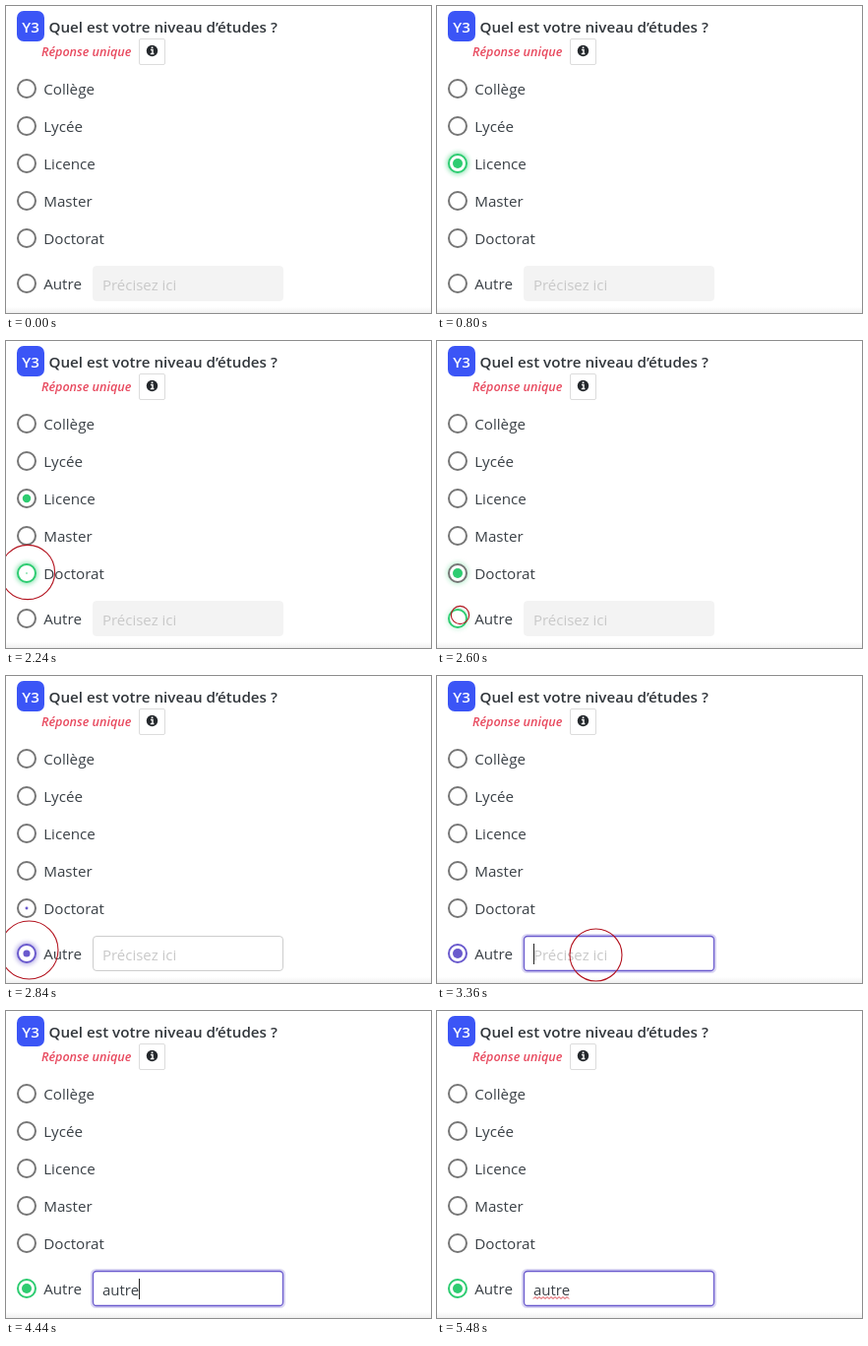
An HTML page that plays this animation: 432x312 px, repeating every 5520 ms.

```html
<!DOCTYPE html>
<html lang="fr">
<head>
<meta charset="utf-8">
<title>Niveau d’études</title>
<style>
  html, body { margin: 0; width: 100%; height: 100%; overflow: hidden; background: #fff; }
  svg { display: block; width: 432px; height: 312px; }
  text { font: 15.2px "Open Sans", "Noto Sans", sans-serif; fill: #3a4046; }
  .title { font-weight: 600; fill: #32373c; }
  .badge { font-weight: 600; fill: #fff; text-anchor: middle; }
  .hint { font-weight: 600; font-style: italic; font-size: 12.6px; fill: #e84a5f; }
  #value { font-size: 15px; }
</style>
</head>
<body>
<svg viewBox="0 0 432 312">
  <defs>
    <filter id="blur" x="-50%" y="-50%" width="200%" height="200%"><feGaussianBlur stdDeviation="2"/></filter>
    <linearGradient id="shade" x2="0" y2="1">
      <stop offset="0" stop-color="#fff"/><stop offset="1" stop-color="#f0f0f0"/>
    </linearGradient>
  </defs>
  <rect width="432" height="312" fill="#fff"/>
  <rect y="306" width="432" height="6" fill="url(#shade)"/>
  <rect x="11" y="5" width="28" height="31" rx="7" fill="#3b55f6"/>
  <text class="badge" x="25" y="27">Y3</text>
  <text class="title" x="43.5" y="27">Quel est votre niveau d’études ?</text>
  <text class="hint" x="36" y="51">Réponse unique</text>
  <rect x="135.5" y="33.5" width="26" height="26" rx="1.5" fill="#fff" stroke="#dcdcdc"/>
  <circle cx="148.5" cy="45.5" r="5.7" fill="#24282c"/>
  <path d="M147 44.5h2v3.6M146.8 48.5h3.6M147.7 42.3h1.7" fill="none" stroke="#fff" stroke-width="1.4"/>
  <g id="radios"></g>
  <rect id="halo" x="87.5" y="263.5" width="195" height="37" rx="4" fill="none" stroke="#6a5acd" stroke-width="3" opacity="0"/>
  <rect id="field" x="88.5" y="264.5" width="193" height="35" rx="3.5"/>
  <text id="value" x="98" y="289"></text>
  <path id="squiggle" fill="none" stroke="#d8323c"/>
  <path id="caret" stroke="#222"/>
  <circle id="ripple" fill="none" stroke="#b3131f" stroke-width="1.1"/>
</svg>
<script>
const LOOP = 5520, STEP = 40;
const GREEN = '#2ecc71', PURPLE = '#6a5acd', GREY = '#767676';
const LICENCE = 2, DOCTORAT = 4, AUTRE = 5;
const ENABLED = 2740, FOCUSED = 3200, TYPED = 3720;

const options = [['Collège', 84], ['Lycée', 122], ['Licence', 160],
                 ['Master', 198], ['Doctorat', 236], ['Autre', 282]];
// When each chosen option gains focus, gets checked, loses focus, gets unchecked
const choices = {
  [LICENCE]: { focus: 520, check: 600, blur: 2000, uncheck: 2220 },
  [DOCTORAT]: { focus: 2000, check: 2220, blur: 2560, uncheck: ENABLED },
  [AUTRE]: { focus: 2560, check: ENABLED, blur: FOCUSED, uncheck: Infinity }
};
const clicks = [[520, 22, 160], [2060, 22, 235], [2565, 23.5, 278.5], [FOCUSED, 161.5, 283.5]];
const keyTimes = [TYPED, 3920, 4000, 4240, 4440];
const word = 'autre';

const $ = id => document.getElementById(id);
const set = (el, attrs) => { for (const k in attrs) el.setAttribute(k, attrs[k]); };
const add = (parent, tag, attrs) => {
  const el = document.createElementNS('http://www.w3.org/2000/svg', tag);
  set(el, attrs);
  return parent.appendChild(el);
};
const ramp = (t, start, length) => Math.sin(Math.min(1, Math.max(0, (t - start) / length)) * Math.PI / 2);
const mix = (a, b, k) => Math.round(a + (b - a) * k);
const grey = v => `rgb(${v},${v},${v})`;

const radios = options.map(([label, cy]) => {
  const group = $('radios'), at = { cx: 21, cy };
  const glow = add(group, 'circle', { ...at, r: 11.5, filter: 'url(#blur)', opacity: 0 });
  const ring = add(group, 'circle', { ...at, r: 9, fill: '#fff', 'stroke-width': 2 });
  const dot = add(group, 'circle', { ...at, r: 0 });
  add(group, 'text', { x: 38.2, y: cy + 6 }).textContent = label;
  return { glow, ring, dot };
});

function drawRadios(t) {
  const accent = t >= ENABLED && t < TYPED ? PURPLE : GREEN;
  radios.forEach(({ glow, ring, dot }, i) => {
    const c = choices[i];
    const active = c && t >= c.focus && (i === AUTRE || t < c.blur);
    set(ring, { stroke: active ? accent : GREY });
    if (!c) return;
    set(glow, { fill: accent, opacity: 0.45 * (ramp(t, c.focus, 150) - ramp(t, c.blur, 150)) });
    set(dot, { fill: accent, r: 5 * (ramp(t, c.check, 200) - ramp(t, c.uncheck, 200)) });
  });
}

function drawField(t) {
  const on = ramp(t, ENABLED, 120), focus = ramp(t, FOCUSED, 150);
  const border = grey(mix(243, 204, on));
  set($('field'), { fill: grey(mix(243, 255, on)), stroke: focus > 0.5 ? PURPLE : border,
                    'stroke-width': focus > 0.5 ? 1.3 : 1 });
  set($('halo'), { opacity: 0.25 * focus });

  const count = keyTimes.filter(k => t >= k).length;
  const value = $('value');
  value.textContent = count ? word.slice(0, count) : 'Précisez ici';
  value.style.fill = count ? '#3a4046' : '#c9c9c9';

  const end = count ? value.getComputedTextLength() : 0;
  const caretX = Math.round(98 + end) + 0.5;
  set($('caret'), { d: `M${caretX} 272V293`, opacity: t >= FOCUSED && t < 4960 ? 1 : 0 });

  let wave = 'M98 292.5';
  for (let x = 2, up = true; x <= end; x += 2, up = !up) wave += `L${98 + x} ${up ? 290.5 : 292.5}`;
  set($('squiggle'), { d: wave, opacity: t >= 5400 ? 1 : 0 });
}

function drawRipple(t) {
  const click = clicks.find(([start]) => t >= start && t < start + 280);
  if (!click) return set($('ripple'), { r: 0, opacity: 0 });
  const [start, cx, cy] = click;
  set($('ripple'), { cx, cy, r: 29.5 * (1 - (1 - (t - start) / 300) ** 3), opacity: 1 });
}

function render(t) {
  drawRadios(t);
  drawField(t);
  drawRipple(t);
}

const origin = performance.now();
function tick() {
  const t = (performance.now() - origin) % LOOP;
  render(Math.floor(t / STEP) * STEP);
  requestAnimationFrame(tick);
}
tick();
</script>
</body>
</html>
```
